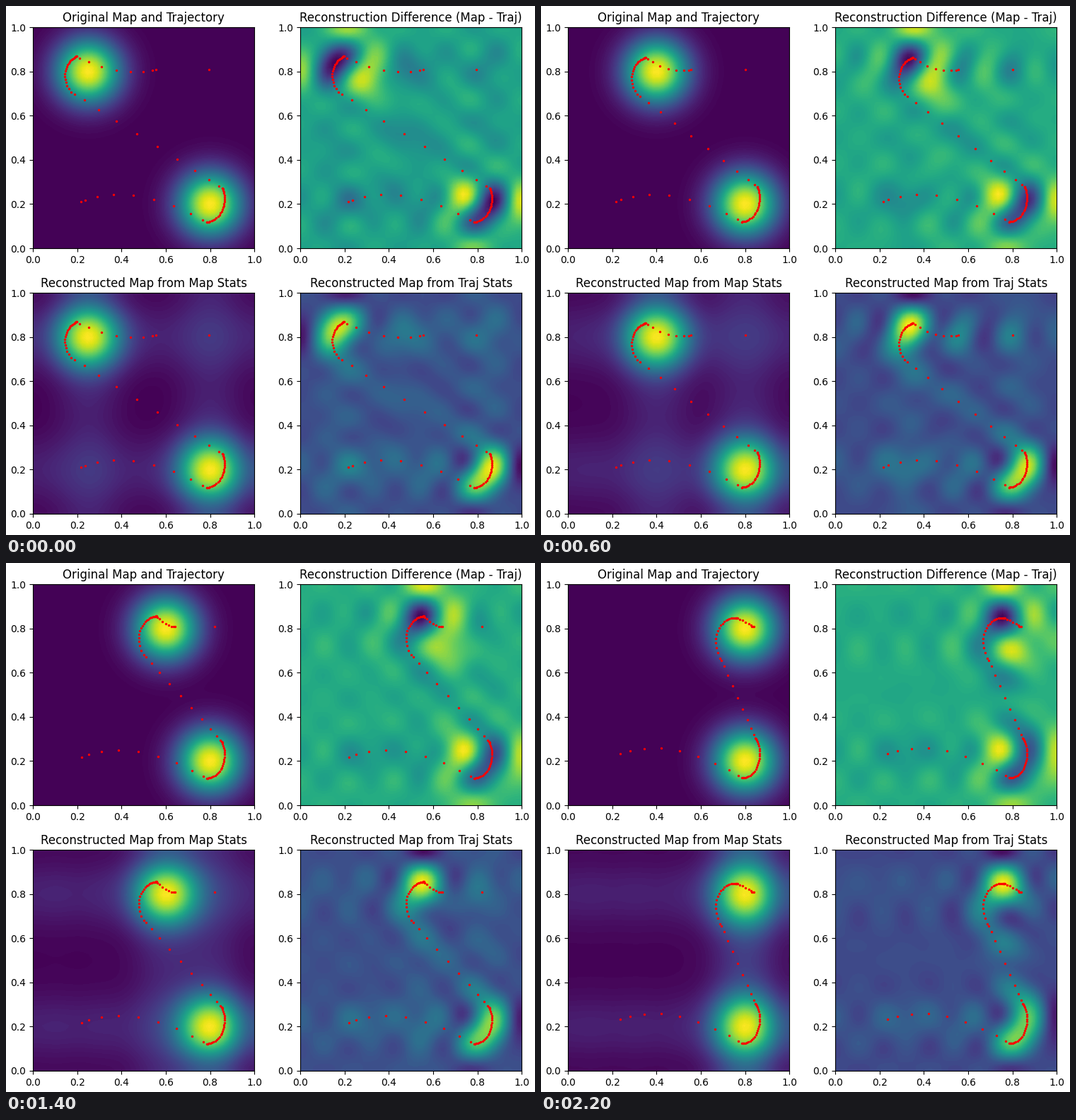
A matplotlib script that plays this animation: 748x749 px, repeating every 2700 ms.

```python
import numpy as np
import matplotlib.pyplot as plt
from matplotlib.animation import FuncAnimation

W, H, DPI = 748, 749, 100
SIDE = 313
MODES = 10
LAST = 11
LOW = np.array([.8, .2])


def ramp(n):
    return np.arange(n)[:, None] / n


def smooth(w):
    return w * w * (3 - 2 * w)


def lerp(a, b, t):
    return a + (b - a) * t


def polar(center, radius, deg):
    a = np.radians(deg)
    return center + radius * np.hstack([np.cos(a), np.sin(a)])


def bezier(pts, u):
    """De Casteljau evaluation at a column of parameters u."""
    pts = [np.asarray(p, float) for p in pts]
    while len(pts) > 1:
        pts = [lerp(p, q, u) for p, q in zip(pts, pts[1:])]
    return pts[0]


def low_hook(w, t):
    deg = lerp(-100, 52 + 12 * t, smooth(w))
    v = (deg + 20) / 70
    return polar(LOW, .06 + .024 * v ** 2 + .005 * (1 + t) * v ** 3, deg)


def high_hook(w, t, center):
    u = (1 - w) ** 1.8
    radius = lerp(.087, .06, t) + lerp(.034, .115, t) * u
    return polar(center, radius, lerp(128, 230, u))


def trajectory(t, high):
    """Approach, slow hook, fast crossing, slow hook, tail, goal."""
    one = np.ones((1, 1))
    low_in, low_out = low_hook(0 * one, t)[0], low_hook(one, t)[0]
    high_in, high_out = high_hook(0 * one, t, high)[0], high_hook(one, t, high)[0]
    late = t * t
    lift = .015 * late

    w = ramp(9)
    approach = bezier([(.218, .211 + lift), (.405, .284 + lift),
                       (.593, .226 + lift), low_in],
                      smooth(w + late / 9 * (1 - w)))
    crossing = lerp(low_out, high_in, smooth(ramp(11)) ** (1 + .2 * t))
    stop = np.array([max(.554, high[0] + .04), .807])
    bend = ((high_out[0] + stop[0]) / 2, lerp(.775, .83, t))
    tail = bezier([high_out, bend, stop], smooth(np.linspace(0, 1, 9)[:, None]))
    goal = [(lerp(.794, .831, smooth(t)), .808)]
    return np.vstack([approach, low_hook(ramp(26), t), crossing,
                      high_hook(ramp(22), t, high), tail, goal])


# Cosine basis on the unit square
k = np.arange(MODES)
norm = np.where(k == 0, 1, np.sqrt(.5))
scale = np.outer(norm, norm)
axis = np.linspace(0, 1, 50)
X, Y = np.meshgrid(axis, axis)


def cosines(x):
    return np.cos(np.pi * np.outer(x, k))


basis = cosines(axis)


def bump(center):
    return np.exp(-50.5 * ((X - center[0]) ** 2 + (Y - center[1]) ** 2))


def map_stats(p):
    return basis.T @ (p / p.sum()).T @ basis / scale


def path_stats(pts):
    return cosines(pts[:, 0]).T @ cosines(pts[:, 1]) / len(pts) / scale


def rebuild(coef):
    return basis @ coef.T @ basis.T


def fields(step):
    high = np.array([.25 + .05 * step, .8])
    pts = trajectory(step / LAST, high)
    target = bump(high) + bump(LOW)
    from_map = rebuild(map_stats(target))
    from_path = rebuild(path_stats(pts))
    return pts, [target, from_map - from_path, from_map, from_path]


fig = plt.figure(figsize=(W / DPI, H / DPI), dpi=DPI)
panels = []
for n, title in enumerate(["Original Map and Trajectory",
                           "Reconstruction Difference (Map - Traj)",
                           "Reconstructed Map from Map Stats",
                           "Reconstructed Map from Traj Stats"]):
    left, bottom = 38.2 + 378 * (n % 2), H - 343 - 376 * (n // 2)
    ax = fig.add_axes([left / W, bottom / H, SIDE / W, SIDE / H])
    ax.set(xlim=(0, 1), ylim=(0, 1))
    ax.set_title(title)
    dots = ax.scatter([], [], s=2, c="red", zorder=2)
    panels.append((ax, dots))
fills = []


def draw(i):
    while fills:
        fills.pop().remove()
    pts, maps = fields(min(i // 2, LAST))
    for (ax, dots), z in zip(panels, maps):
        fills.append(ax.contourf(X, Y, z, levels=100, cmap="viridis"))
        dots.set_offsets(pts)
    return [dots for _, dots in panels]


anim = FuncAnimation(fig, draw, frames=27, interval=100, repeat=True,
                     repeat_delay=0, init_func=lambda: [], blit=False)
plt.show()
```
